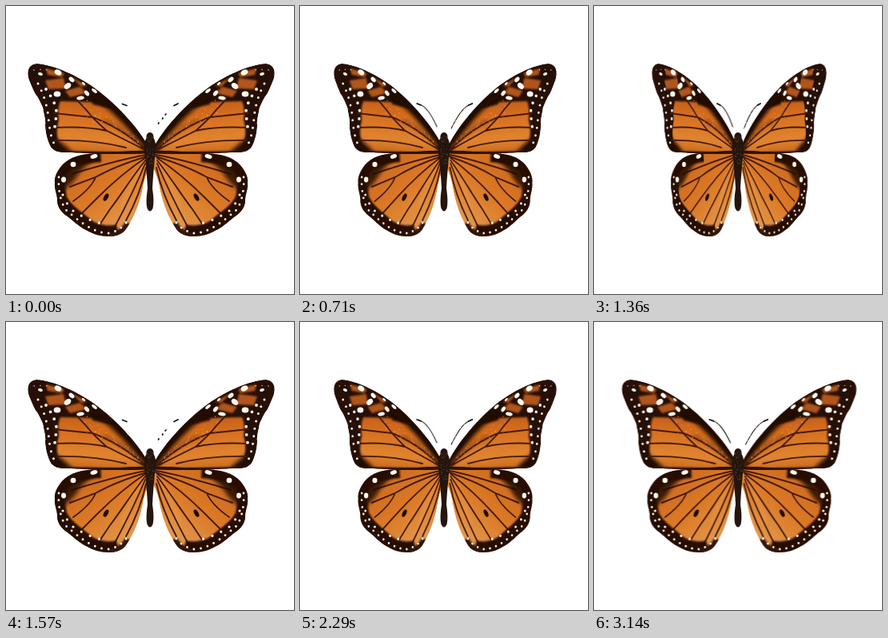
Recreate the animation shown at these times as an HTML page. Size 360x360 px, loop 3.21 s.

```html
<!DOCTYPE html>
<html lang="en">
<head>
<meta charset="utf-8">
<title>Butterfly</title>
<style>
  html, body { margin: 0; width: 100%; height: 100%; overflow: hidden; background: #fff; }
  svg { display: block; width: 100vw; height: 100vh; }
  .side { transform-origin: 181.5px 0; }
  .vein { fill: none; stroke: #45190a; stroke-width: 1.9; stroke-linecap: round; }
  .dots { fill: none; stroke: #fff8ee; stroke-linecap: round; }
  .feeler { fill: none; stroke: #3a302c; stroke-width: 1.2; vector-effect: non-scaling-stroke; stroke-linecap: round; }
  .tip { stroke: #14100e; stroke-width: 1.7; }
</style>
</head>
<body>
<svg viewBox="0 0 360 360">
  <defs>
    <linearGradient id="amber" gradientUnits="userSpaceOnUse" x1="112" y1="114" x2="106" y2="184">
      <stop offset="0" stop-color="#bf5a18"/>
      <stop offset=".35" stop-color="#d66f1f"/>
      <stop offset=".75" stop-color="#e08430"/>
      <stop offset="1" stop-color="#c96a1e"/>
    </linearGradient>
    <linearGradient id="rust" gradientUnits="userSpaceOnUse" x1="90" y1="196" x2="152" y2="275">
      <stop offset="0" stop-color="#cc6a20"/>
      <stop offset=".5" stop-color="#dc7a26"/>
      <stop offset="1" stop-color="#e29a50"/>
    </linearGradient>
    <filter id="soft" x="-30%" y="-30%" width="160%" height="160%"><feGaussianBlur stdDeviation="2.4"/></filter>
    <filter id="edge" x="-10%" y="-10%" width="120%" height="120%"><feGaussianBlur stdDeviation="1"/></filter>
    <filter id="fine" x="-10%" y="-10%" width="120%" height="120%"><feGaussianBlur stdDeviation=".5"/></filter>
    <path id="fore" d="M182 184C172 160 142 125 110 102C91 88 60 73 38 72C28 73 25 82 29 93C32 100 34 105 36 109C41 115 43 121 46 127C47 135 50 142 49 149C49 158 52 168 55 174C58 181 66 183 74 183C90 183 130 187 182 184Z"/>
    <path id="hind" d="M182 180C155 183 140 183 118 184C95 184 79 189 70 199C64 206 60 214 61 221C60 228 64 236 64 242C64 250 68 256 74 261C83 267 90 275 100 280C108 285 118 288 128 288C138 288 146 285 150 279C160 265 168 246 172 222Q176 206 182 198Z"/>
    <clipPath id="foreClip"><use href="#fore"/></clipPath>
    <clipPath id="hindClip"><use href="#hind"/></clipPath>

    <g id="wing">
      <g clip-path="url(#hindClip)">
        <use href="#hind" fill="url(#rust)"/>
        <path d="M182 186Q158 212 146 252" stroke="#e89a4c" stroke-width="7" fill="none" opacity=".5" filter="url(#soft)"/>
        <g class="vein" filter="url(#fine)">
          <path d="M176 186C150 190 122 198 82 210M176 188C150 196 126 206 112 214L80 226M112 214C108 224 98 234 84 244M174 190C150 206 134 220 114 240L94 260M174 193C156 216 144 236 130 254L118 272M174 197C162 226 152 246 136 276M175 202C170 226 162 246 150 268"/>
        </g>
        <path d="M84 188Q66 204 72 230Q84 222 92 208L106 194L118 184Z" fill="#240e06" opacity=".85" filter="url(#soft)"/>
        <path d="M118 182C95 184 79 188 68 199C58 214 61 232 64 244C68 258 86 268 100 280" fill="none" stroke="#260f06" stroke-width="26" filter="url(#edge)"/>
        <path d="M64 244C68 258 86 268 100 280C112 287 130 290 142 286" fill="none" stroke="#260f06" stroke-width="27" filter="url(#edge)"/>
        <path d="M128 289Q146 288 154 272" fill="none" stroke="#30140a" stroke-width="11" filter="url(#edge)"/>
        <ellipse cx="125" cy="239" rx="2.6" ry="5.2" transform="rotate(28 125 239)" fill="#1c0c05"/>
        <path class="dots" d="M66 214C65 228 68 246 75 255C88 266 108 284 128 284C139 282 145 277 151 270" stroke-width="2.8" stroke-dasharray="0 8.7"/>
        <path class="dots" d="M71 236C75 246 79 251 84 256C96 264 112 272 128 273" stroke-width="3.2" stroke-dasharray="0 12"/>
      </g>

      <g clip-path="url(#foreClip)">
        <use href="#fore" fill="#260f06"/>
        <g fill="#b0561a" filter="url(#edge)">
          <path d="M49 93L72 90L75 103L53 104Z"/>
          <path d="M50 78L73 84L70 89L52 86Z"/>
          <path d="M74 106L92 101L104 108L80 114Z"/>
          <path d="M82 89L104 101L94 101Z"/>
        </g>
        <path d="M178 181C162 158 148 143 132 128Q116 121 104 120L68 119Q64 128 66 142Q60 164 70 181L114 182Q146 184 178 181Z" fill="url(#amber)" filter="url(#edge)"/>
        <path d="M108 114L124 114L138 128L126 127L108 123Z" fill="#210d06" opacity=".9" filter="url(#edge)"/>
        <path d="M180 180C158 146 130 120 100 99" fill="none" stroke="#210d06" stroke-width="13" opacity=".95" filter="url(#soft)"/>
        <path d="M174 178C155 160 142 150 122 143" fill="none" stroke="#7a340f" stroke-width="5" opacity=".6" filter="url(#soft)"/>
        <path d="M50 186L53 160Q68 168 84 184Z" fill="#210d06" filter="url(#soft)"/>
        <path class="vein" filter="url(#fine)" d="M60 134L108 139Q142 151 174 179M60 152Q100 150 126 156L174 180M90 119Q100 129 108 139M126 156Q118 149 108 139M62 168Q110 167 150 177"/>
        <path d="M56 183Q120 188 182 182" fill="none" stroke="#2c1208" stroke-width="5.5" filter="url(#fine)"/>
        <path class="dots" d="M40 97C46 108 50 120 52 132C54 146 54 160 61 174" stroke-width="3" stroke-dasharray="0 9.6"/>
        <path class="dots" d="M50 104C57 114 62 122 63 132C63 142 60 150 61 160" stroke-width="3.8" stroke-dasharray="0 10"/>
        <path class="dots" d="M35 80L47 79L58 81" stroke-width="1.4" stroke-dasharray="0 8"/>
      </g>
      <g id="spots" fill="#fff9f0"></g>
      <g id="specks" fill="#f3ad62"></g>
    </g>
  </defs>

  <g class="side" data-dir="1">
    <use href="#wing"/>
    <g class="full">
      <path class="feeler" d="M142.500 122C155 124 163 137 170 151"/>
      <path class="feeler tip" d="M142.500 122L148 124"/>
    </g>
    <path class="feeler tip rest" d="M145.500 122.500L151 124.500"/>
  </g>
  <g class="side" data-dir="-1">
    <use href="#wing"/>
    <g class="full">
      <path class="feeler" d="M144 122C156 125 164 137 173 153" stroke-dasharray="11 1.500 5 1.500"/>
      <path class="feeler tip" d="M144 122L149 124"/>
    </g>
    <path class="feeler tip rest" d="M148 122L153 124.500M163 135L164 136M167 140L167.500 141M172 146L172.500 147"/>
  </g>

  <g fill="#24150e">
    <path d="M180 158C183 158 185 161 184.500 165C188 170 188 181 186 189C185 202 183.500 216 183 228C184.500 238 185 247 183.500 253Q180 260 176.500 253C175 247 175.500 238 177 228C176.500 216 175 202 174 189C172 181 172 170 175.500 165C175 161 177 158 180 158Z"/>
    <g id="fuzz" fill="#74543b"></g>
  </g>
</svg>
<script>
const $ = id => document.getElementById(id);

// x, y, rx, ry, tilt
const spots = [
  [65, 83, 4.6, 3.2, 25], [77, 100, 4.8, 3.4, -35], [82, 92, 4, 2.5, 40],
  [93, 115, 4.8, 2.3, -10], [101, 109, 3.8, 2.4, 50], [110.5, 106, 4, 1.8, 40],
  [97, 97, 2.6, 1.4, 40], [64, 110, 4.4, 3.6, 0], [43, 85, 3, 1.8, 20],
  [110, 188, 4.6, 2.7, -15], [84, 198, 3.4, 3.2, 0], [72, 217, 3, 3.4, 0]
];

let seed = 11;
const rand = () => (seed = seed * 16807 % 2147483647) / 2147483647;

function blob(parent, x, y, rx, ry = rx, tilt = 0) {
  const e = document.createElementNS(parent.namespaceURI, 'ellipse');
  Object.entries({ cx: x, cy: y, rx, ry, transform: `rotate(${tilt} ${x} ${y})` })
    .forEach(([k, v]) => e.setAttribute(k, v));
  parent.append(e);
}

spots.forEach(s => blob($('spots'), ...s));
for (let i = 0; i < 60; i++) {
  const x = 98 + 70 * rand();
  blob($('specks'), x, 122 + (x - 98) * .7 + 26 * (rand() - .3) * (1 - (x - 98) / 90), .25 + .4 * rand());
}
for (let i = 0; i < 40; i++) blob($('fuzz'), 176 + 8 * rand(), 163 + 34 * rand(), .3 + .3 * rand());

// Ping-pong through 11 poses, 40 ms each, shown at 14 pictures a second.
const count = 45, duration = 3210;
const steps = Array.from({ length: count }, (_, k) => {
  const i = Math.ceil(k * 25 / 14) % 20;
  return { at: Math.round(k * 100 / 14) * 10 / duration, pose: Math.min(i, 20 - i) };
});
steps.push({ at: 1, pose: 0 });

function play(el, look) {
  const frames = steps.map(s => ({ offset: s.at, easing: 'step-end', ...look(s.pose) }));
  el.animate(frames, { duration, iterations: Infinity });
}

document.querySelectorAll('.side').forEach(side => {
  const dir = side.dataset.dir;
  play(side, p => ({ transform: `scaleX(${dir * (1 - .0487 * p)})` }));
  play(side.querySelector('.full'), p => ({ opacity: p ? 1 : 0 }));
  play(side.querySelector('.rest'), p => ({ opacity: p ? 0 : 1 }));
});
</script>
</body>
</html>
```
